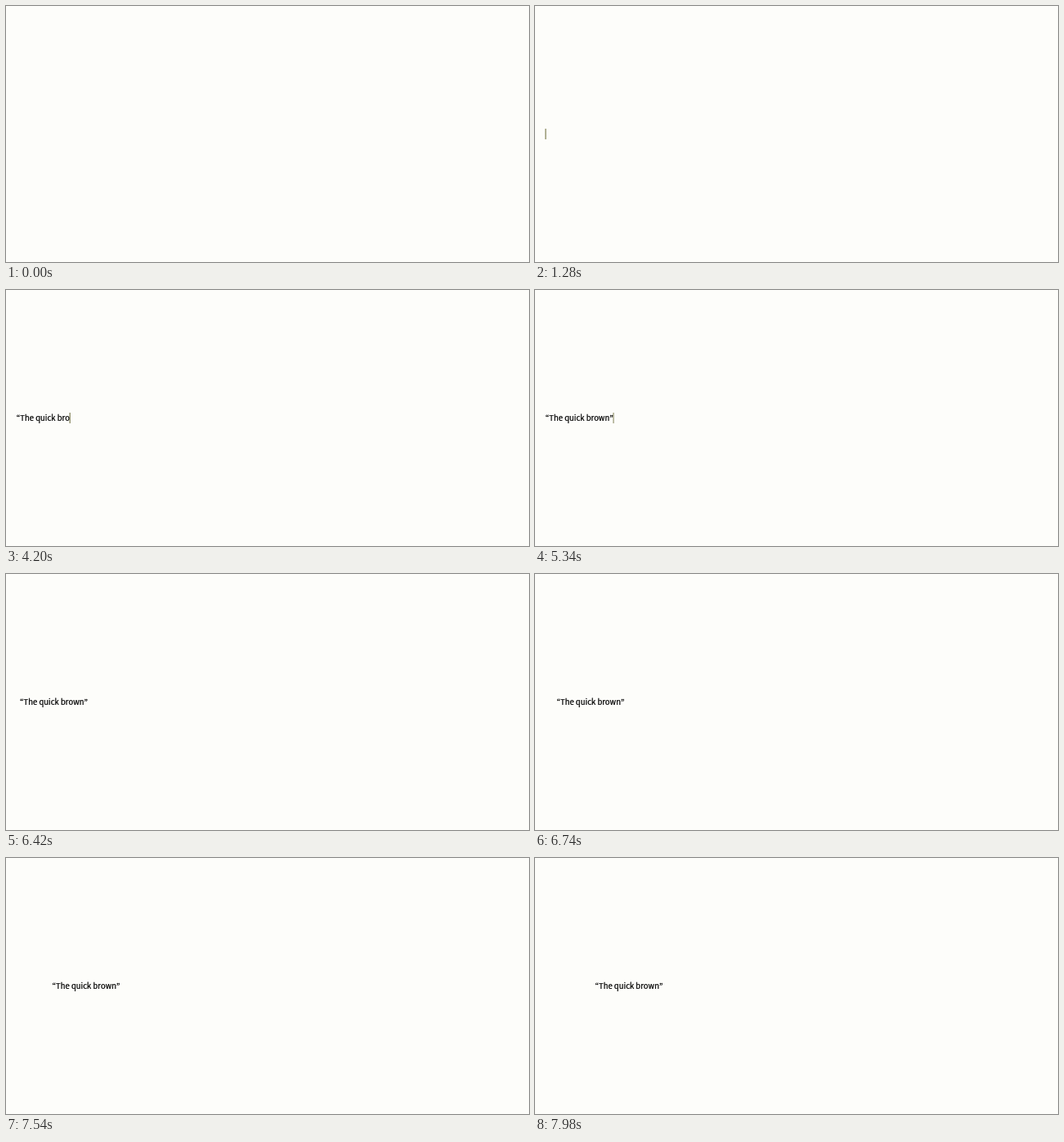
An HTML page with a canvas for the animation above (8000 ms loop, 640 px wide and 313 px high).

```html
<!DOCTYPE html>
<html lang="en">
<head>
<meta charset="utf-8">
<title>Typing</title>
<style>
html, body { margin: 0; width: 100%; height: 100%; overflow: hidden; background: #fdfdfa; }
canvas { display: block; }
</style>
</head>
<body>
<canvas id="stage" width="640" height="313"></canvas>
<script>
const ctx = document.getElementById('stage').getContext('2d');
const LOOP = 8000, SIZE = 9.52, ZOOM = 10;
const LEFT = 17.25, BASE = 160, QUOTE = 0.47 * SIZE;
const BODY = 'The quick brown';
const PAPER = '#fdfdfa', INK = '#000', CARET = '#55551c';

// tick at which each character appears: opening quote, body, closing quote
const KEYS = [28, 34, 40, 40, 43, 44, 47, 50, 53, 57, 78, 82, 86, 88, 91, 94, 100];
// slide to the right: tick, offset, speed
const SLIDE = [[120, 0, 0], [136, 4.3, 0.8], [151, 26.3, 2.05], [170, 60.7, 1.55]];

const ramp = (n, a, b) => Math.min(1, Math.max(0, (n - a) / (b - a)));

// Three ticks every 140 ms, lasting 100, 20 and 20 ms
function tickAt(ms) {
  const u = ms - 20, k = Math.floor(u / 140), p = u - 140 * k;
  return 3 * k + (p < 100 ? 0 : p < 120 ? 1 : 2);
}

function slideAt(n) {
  if (n <= SLIDE[0][0]) return 0;
  let i = 0;
  while (i < SLIDE.length - 2 && n > SLIDE[i + 1][0]) i++;
  const [t0, x0, v0] = SLIDE[i], [t1, x1, v1] = SLIDE[i + 1];
  const d = t1 - t0, s = (n - t0) / d, r = 1 - s;
  return (1 + 2 * s) * r * r * x0 + s * r * r * d * v0
    + s * s * (3 - 2 * s) * x1 - s * s * r * d * v1;
}

function caretAlpha(n) {
  if (n < 58) return ramp(n, 5, 20);
  if (n < 78) return 1 - ramp(n, 58, 75);
  return 1 - ramp(n, 111, 129);
}

// Laid out at a large size and scaled down for fractional glyph positions
function write(text, x, align) {
  ctx.save();
  ctx.translate(x, BASE);
  ctx.scale(1 / ZOOM, 1 / ZOOM);
  ctx.font = `400 ${SIZE * ZOOM}px "Noto Sans CJK KR", "Noto Sans CJK JP", "Noto Sans CJK SC", sans-serif`;
  ctx.textAlign = align;
  ctx.fillStyle = ctx.strokeStyle = INK;
  ctx.lineWidth = 2.5;
  ctx.lineJoin = 'round';
  ctx.fillText(text, 0, 0);
  ctx.strokeText(text, 0, 0);
  const width = ctx.measureText(text).width / ZOOM;
  ctx.restore();
  return width;
}

function draw(now) {
  const n = tickAt(now % LOOP);
  const typed = KEYS.filter(k => k <= n).length;
  const x = LEFT + slideAt(n);
  let caret = x - QUOTE;

  ctx.fillStyle = PAPER;
  ctx.fillRect(0, 0, 640, 313);
  if (typed > 0) {
    write('“', x, 'right');
    caret = x + write(BODY.slice(0, typed - 1), x, 'left');
  }
  if (typed === KEYS.length) {
    write('”', caret, 'left');
    caret += QUOTE;
  }
  ctx.globalAlpha = caretAlpha(n);
  ctx.fillStyle = CARET;
  ctx.fillRect(caret - 0.2, 150, 0.9, 13);
  ctx.globalAlpha = 1;
  requestAnimationFrame(loop);
}

const loop = () => draw(performance.now());
loop();
</script>
</body>
</html>
```
